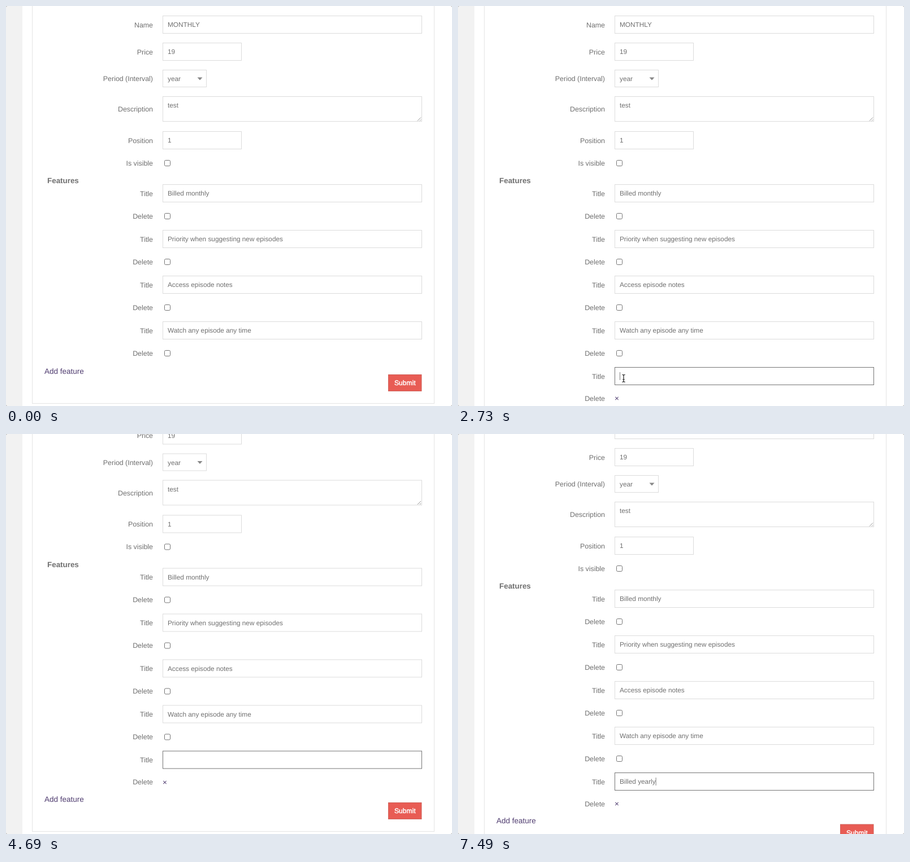
Recreate the animation shown at these times as an HTML page. Size 789 px wide and 709 px high, loop 8 s.

```html
<!DOCTYPE html>
<html lang="en">
<head>
<meta charset="utf-8">
<title>Plan form</title>
<style>
  html, body { margin: 0; width: 100%; height: 100%; overflow: hidden; background: #fff; }
  svg { display: block; width: 789px; height: 709px; }
  text { font-family: "Liberation Sans", Arial, sans-serif; text-rendering: geometricPrecision; white-space: pre; }
  .label { font-size: 12.4px; fill: #707070; text-anchor: end; }
  .value { font-size: 11.8px; fill: #707070; }
  .heading { font-size: 13.4px; font-weight: bold; fill: #707070; }
  .link { font-size: 13.5px; fill: #503d70; }
  .submit { font-size: 12.1px; fill: #fff; stroke: #fff; stroke-width: .45px; }
  .field { fill: #fff; stroke: #dcdcdc; }
  .check { fill: #fff; stroke: #757575; }
</style>
</head>
<body>
<svg viewBox="0 0 789 709">
  <rect width="789" height="709" fill="#fff"/>
  <rect width="29" height="709" fill="#f2f2f2"/>
  <g id="page">
    <g id="foot"></g>
    <g id="form"></g>
    <g id="extra"></g>
  </g>
  <path d="M0 3V0H3A3 3 0 0 0 0 3M786 0H789V3A3 3 0 0 0 786 0M0 706V709H3A3 3 0 0 1 0 706M789 706V709H786A3 3 0 0 0 789 706" fill="#aaa"/>
  <g id="cursor">
    <path id="arrow" d="M0 0V11.6L2.7 9.2L4.5 13.3L6.5 12.4L4.8 8.5H8.3Z" fill="#000" stroke="#fff" stroke-width=".8"/>
    <path id="hand" d="M-1 1Q0-.6 1 1V5L7 6.3Q8.3 6.8 8 8.5L7 13.5H0L-4.3 8.3Q-4-6.5-4 7Q-3 6.4-1 8.2Z" fill="#fff" stroke="#000" stroke-width=".9"/>
    <path id="beam" d="M-2.7-6.5Q0-6.5 0-5V5Q0 6.5-2.7 6.5M2.7-6.5Q0-6.5 0-5M2.7 6.5Q0 6.5 0 5M-1.8 2H1.8" fill="none" stroke="#222" stroke-width="1.2"/>
  </g>
</svg>
<script>
const LOOP = 8000, STEP = 70, ROW = 78.5;
const $ = id => document.getElementById(id);

function add(parent, tag, attrs, text = "") {
  const el = document.createElementNS("http://www.w3.org/2000/svg", tag);
  for (const key in attrs) el.setAttribute(key, attrs[key]);
  el.textContent = text;
  return parent.appendChild(el);
}

// Text is placed by the middle of its capitals.
const EM = { label: 12.4, value: 11.8, heading: 13.4, link: 13.5, submit: 12.1 };
const write = (g, kind, x, mid, text) =>
  add(g, "text", { class: kind, x, y: mid + EM[kind] * .355 }, text);
const box = (g, kind, x, y, width, height, rx = 0) =>
  add(g, "rect", { class: kind, x: x + .5, y: y + .5, width: width - 1, height: height - 1, rx });
const label = (g, mid, text) => write(g, "label", 260, mid, text);
const check = mid => box(form, "check", 280, mid - 5, 11, 11, 2);

function field(g, name, y, text, width = 459, height = 32) {
  label(g, y + height / 2 + .5, name);
  const frame = box(g, "field", 277, y, width, height);
  const value = write(g, "value", 286, y + 16, text);
  return { frame, value };
}

const form = $("form"), foot = $("foot"), extra = $("extra");

field(form, "Name", 17, "MONTHLY");
field(form, "Price", 65, "19", 140);
field(form, "Period (Interval)", 113, "year", 78, 31);
add(form, "path", { d: "M338.5 126.5H347.5L343 131.5Z", fill: "#888" });
field(form, "Description", 160, "test", 459, 45);
add(form, "path", { d: "M728 203.5L734 197.5M732 203.5L734 201.5", stroke: "#888", "stroke-width": .9 });
field(form, "Position", 222, "1", 140);
label(form, 278.5, "Is visible");
check(278);
write(form, "heading", 73, 309.5, "Features");

["Billed monthly", "Priority when suggesting new episodes", "Access episode notes", "Watch any episode any time"]
  .forEach((title, i) => {
    const y = 316 + 81 * i;
    field(form, "Title", y, title);
    label(form, y + 56.5, "Delete");
    check(y + 56);
  });

const entry = field(extra, "Title", 640, "");
label(extra, 695.5, "Delete");
write(extra, "link", 277, 695.5, "×");
const caret = add(extra, "rect", { y: 649, width: 1, height: 14, fill: "#808080" });

add(foot, "rect", { x: 46.5, y: -300.5, width: 711, height: 1005, fill: "#fff", stroke: "#e4e4e4" });
write(foot, "link", 68, 647, "Add feature");
add(foot, "rect", { x: 676.5, y: 653.5, width: 58.5, height: 29, fill: "#e85c54", stroke: "#d0625b" });
write(foot, "submit", 687, 668, "Submit");

// Keyframes: [time, ...values], linear in between.
const scrollKeys = [[2940, 0], [3080, ROW], [4690, ROW], [4760, 40]];
const cursorKeys = [[700, 352, 722], [840, 285, 684], [980, 185, 640], [1050, 152, 635], [1190, 125, 647.5],
  [1400, 122, 643], [2100, 122, 643], [2240, 142, 664], [2380, 208, 682], [2520, 274, 674], [2660, 293, 660]];
const keyTimes = [4760, 4970, 5250, 5390, 5530, 5740, 6300, 6790, 6930, 6930, 7140, 7280, 7490];
const blinkTimes = [2660, 3220, 3710, 4270, 4760, 6230, 6300];
const typed = "Billed yearly";

function sample(keys, t) {
  const i = keys.findIndex(k => k[0] > t);
  if (i === 0) return keys[0].slice(1);
  if (i < 0) return keys[keys.length - 1].slice(1);
  const [a, b] = [keys[i - 1], keys[i]];
  const p = (t - a[0]) / (b[0] - a[0]);
  return a.slice(1).map((v, n) => v + (b[n + 1] - v) * p);
}

const passed = (times, t) => times.filter(x => x <= t).length;
const show = (el, on) => el.setAttribute("visibility", on ? "visible" : "hidden");
const move = (el, x, y) => el.setAttribute("transform", `translate(${x} ${y})`);

function draw(t) {
  const added = t >= 1680, focused = t >= 2660;
  move($("page"), 0, -sample(scrollKeys, t)[0]);
  move(foot, 0, added ? ROW : 0);
  extra.style.display = added ? "" : "none";
  entry.frame.style.stroke = focused ? "#757575" : "";

  const text = typed.slice(0, passed(keyTimes, t));
  entry.value.textContent = text;
  caret.setAttribute("x", 286 + (text && added ? entry.value.getComputedTextLength() : 0));
  show(caret, passed(blinkTimes, t) % 2);

  const [x, y] = sample(cursorKeys, t);
  const shape = t >= 2590 ? "beam" : t > 1190 && !added ? "hand" : "arrow";
  move($("cursor"), x, y);
  for (const id of ["arrow", "hand", "beam"]) show($(id), id === shape && t >= 770 && t < 3710);
}

function frame() {
  const t = performance.now() % LOOP;
  draw(Math.floor(t / STEP) * STEP);
  requestAnimationFrame(frame);
}
frame();
</script>
</body>
</html>
```
